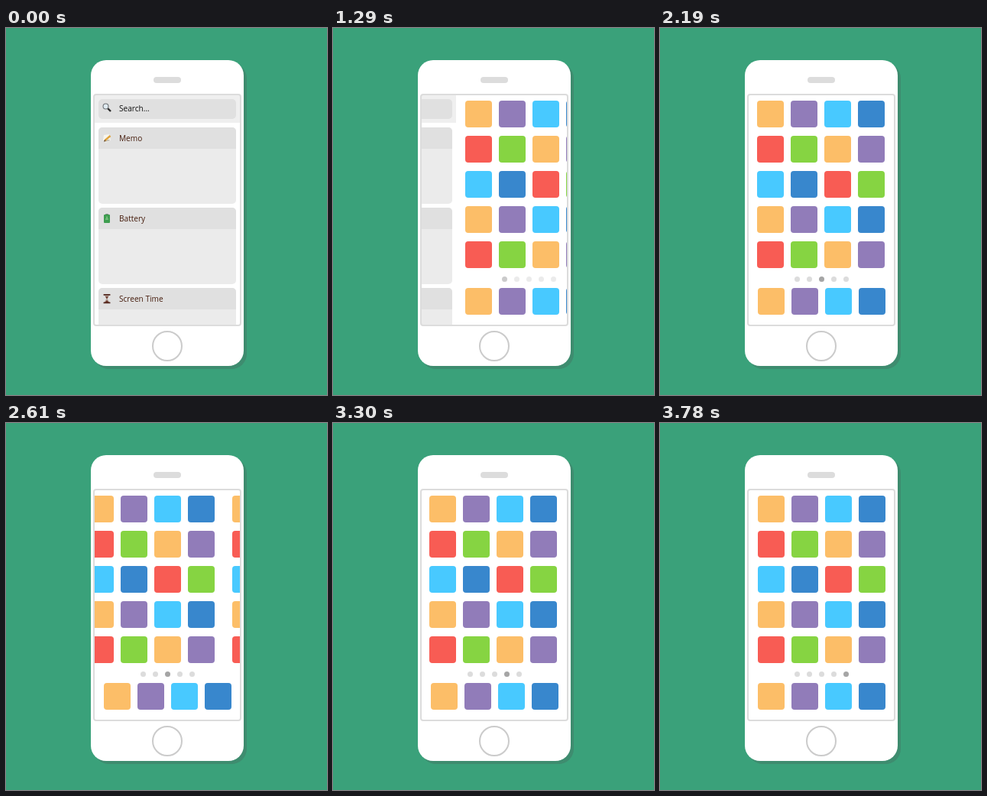
These frames come from a looping animation (420 px wide and 480 px high, 4890 ms). An HTML page with a canvas:

```html
<!DOCTYPE html>
<html lang="en">
<head>
<meta charset="utf-8">
<title>Phone home screen</title>
<style>
  html, body { margin: 0; height: 100%; overflow: hidden; background: #3aa17a; }
  canvas { display: block; }
</style>
</head>
<body>
<canvas width="420" height="480"></canvas>
<script>
const ctx = document.querySelector('canvas').getContext('2d');
const LOOP = 4890, PAGE = 190;
const COLORS = ['#fcbe68', '#917cb9', '#48c9ff', '#3887cd', '#f85c54', '#86d442'];

// Each swipe: start, duration, scroll offset reached, time the active dot changes
const SWIPES = [
  { start: 960, time: 500, to: 190, dotAt: 1500 },
  { start: 1713, time: 440, to: 381, dotAt: 1950 },
  { start: 2496, time: 500, to: 570, dotAt: 2745 },
  { start: 3266, time: 500, to: 760, dotAt: 3530 }
];

// cubic-bezier(.42, 0, .58, 1)
function easeInOut(x) {
  let low = 0, high = 1, s = 0.5;
  for (let i = 0; i < 20; i++) {
    s = (low + high) / 2;
    const bx = 1.26 * s * (1 - s) ** 2 + 1.74 * s * s * (1 - s) + s ** 3;
    if (bx < x) low = s; else high = s;
  }
  return s * s * (3 - 2 * s);
}

function progress(swipe, t) {
  return easeInOut(Math.min(1, Math.max(0, (t - swipe.start) / swipe.time)));
}

function box(x, y, w, h, r, fill) {
  ctx.beginPath();
  ctx.roundRect(x, y, w, h, r);
  ctx.fillStyle = fill;
  ctx.fill();
}

function circle(x, y, r, fill) {
  ctx.beginPath();
  ctx.arc(x, y, r, 0, 7);
  ctx.fillStyle = fill;
  ctx.fill();
}

function shape(points, fill) {
  ctx.beginPath();
  points.forEach(([x, y]) => ctx.lineTo(x, y));
  ctx.fillStyle = fill;
  ctx.fill();
}

function line(x1, y1, x2, y2, width, color) {
  ctx.beginPath();
  ctx.moveTo(x1, y1);
  ctx.lineTo(x2, y2);
  ctx.lineWidth = width;
  ctx.strokeStyle = color;
  ctx.stroke();
}

function label(text, y, color) {
  ctx.font = '10.1px "Open Sans", "Noto Sans", sans-serif';
  ctx.fillStyle = color;
  ctx.fillText(text, 148, y);
}

// Small pictograms, each centred on the origin
const GLYPHS = {
  search() {
    line(1, 1, 5, 5, 2.4, '#2b2b2b');
    circle(-1.5, -1.5, 4, '#6f7478');
    circle(-1.5, -1.5, 2.9, '#dfeaf0');
  },
  memo() {
    shape([[-4, -4], [3, -5], [5, 3], [-2, 6], [-5, 3]], '#f7f5ee');
    line(-4, 4.5, 3.5, 2.5, 1.5, '#b9b4aa');
    line(-2.5, 3, 4.5, -3, 2.4, '#dfa33c');
    line(-3.5, 4, -2, 2.6, 1.5, '#6b4a2a');
  },
  battery() {
    box(-2, -6, 4, 2, 0.5, '#7c8a80');
    box(-4, -5, 8, 11, 1, '#3f9e50');
    line(-1.8, 1, 1.8, 1, 1, '#a9dba8');
    line(0, -2.5, 0, 0, 1, '#a9dba8');
  },
  hourglass() {
    shape([[-3.5, -5], [3.5, -5], [0.7, 0], [3.5, 5], [-3.5, 5], [-0.7, 0]], '#b9a9a2');
    shape([[-2, -2.8], [2, -2.8], [0, 0.3]], '#6b3426');
    shape([[0, 2], [2.8, 5], [-2.8, 5]], '#6b3426');
    box(-4.5, -6, 9, 1.8, 0.5, '#54291f');
    box(-4.5, 4.4, 9, 1.8, 0.5, '#54291f');
  }
};

function glyph(name, y) {
  ctx.save();
  ctx.translate(132, y);
  GLYPHS[name]();
  ctx.restore();
}

function card(y, title, icon) {
  box(121, y, 180, 100, 5, '#ebebeb');
  box(121, y, 180, 28, [5, 5, 0, 0], '#e0e0e0');
  glyph(icon, y + 14);
  label(title, y + 18, '#451c0c');
}

function widgets() {
  box(116, 88, PAGE, 36, 0, '#efefef');
  box(121, 93, 180, 26, 5, '#e0e0e0');
  glyph('search', 104);
  label('Search...', 109, '#111');
  card(130, 'Memo', 'memo');
  card(235, 'Battery', 'battery');
  card(340, 'Screen Time', 'hourglass');
}

function iconRow(y, first) {
  for (let col = 0; col < 4; col++) {
    box(128 + col * 44, y, 35, 35, 4, COLORS[(first + col) % 6]);
  }
}

function iconPage() {
  for (let row = 0; row < 5; row++) iconRow(95 + row * 46, row * 4);
}

function shifted(dx, draw) {
  ctx.save();
  ctx.translate(dx, 0);
  draw();
  ctx.restore();
}

function phone() {
  box(0, 0, 420, 480, 0, '#3aa17a');
  box(115, 46, 200, 400, 20, '#3e8c6f');
  box(111, 42, 200, 400, 20, '#fff');
  box(193, 64, 36, 8, 4, '#dcdcdc');
  ctx.beginPath();
  ctx.arc(211, 416, 19, 0, 7);
  ctx.lineWidth = 2;
  ctx.strokeStyle = '#cbcbcb';
  ctx.stroke();
}

function render(t) {
  let offset = 0, from = 0, active = 0;
  for (const swipe of SWIPES) {
    offset += (swipe.to - from) * progress(swipe, t);
    from = swipe.to;
    if (t >= swipe.dotAt) active++;
  }
  offset = Math.round(offset);

  phone();
  ctx.save();
  ctx.beginPath();
  ctx.rect(116, 88, PAGE, 300);
  ctx.clip();
  shifted(-offset, widgets);
  for (let page = 1; page < 5; page++) shifted(page * PAGE - offset, iconPage);

  // The dock and dots arrive with the first icon page, then stay
  shifted(Math.max(0, PAGE - offset), () => {
    iconRow(340, 0);
    ctx.globalAlpha = progress(SWIPES[0], t) ** 2;
    for (let i = 0; i < 5; i++) {
      circle(179.5 + i * 16, 328.5, 3.5, i === active ? '#a5a5a5' : '#dcdcdc');
    }
  });
  ctx.restore();

  ctx.beginPath();
  ctx.roundRect(115, 87, 192, 302, 3);
  ctx.lineWidth = 2;
  ctx.strokeStyle = '#dcdcdc';
  ctx.stroke();
}

const origin = performance.now();
function tick() {
  render((performance.now() - origin) % LOOP);
  requestAnimationFrame(tick);
}
tick();
</script>
</body>
</html>
```
